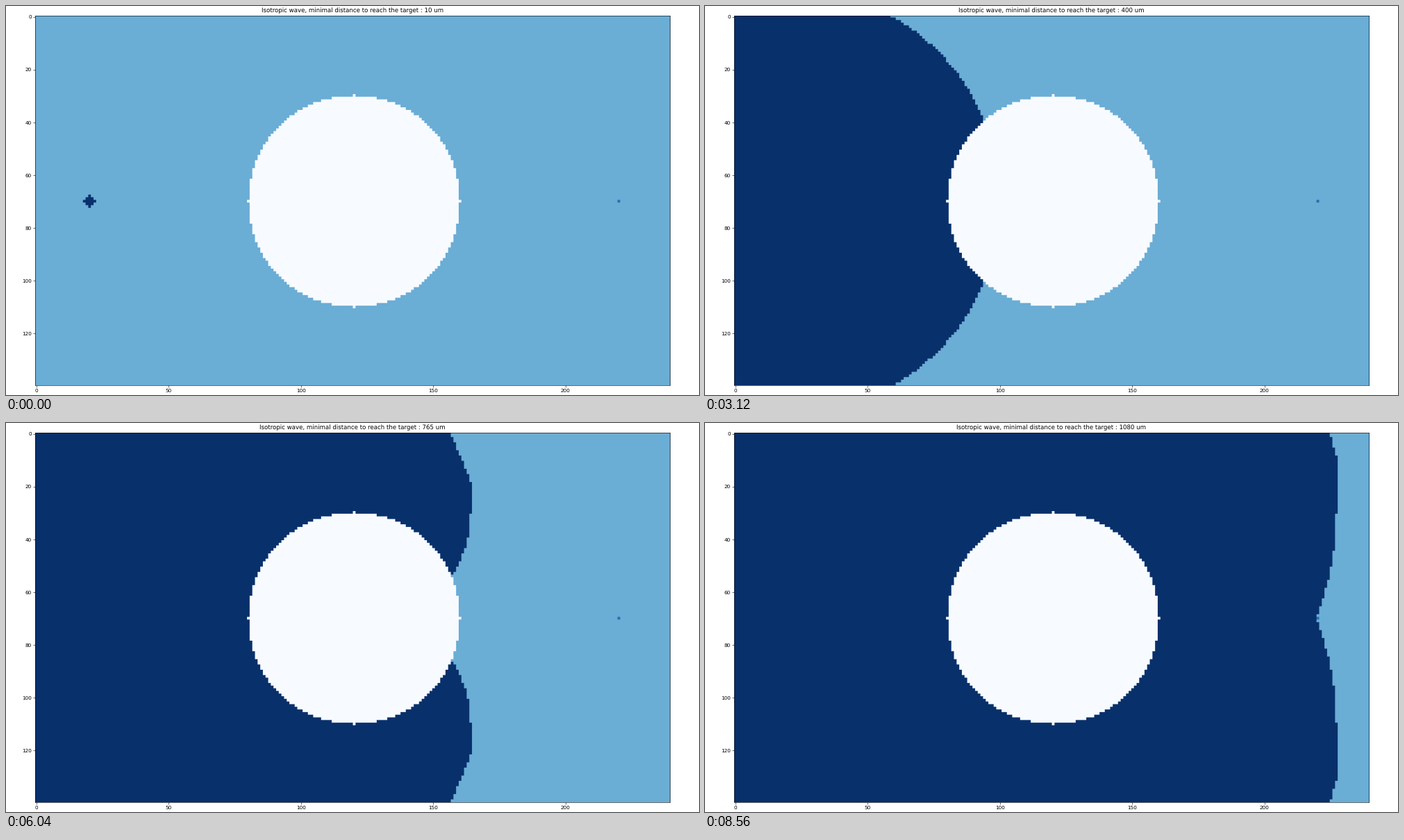
Recreate the animation shown at these times as a matplotlib script. Size 998x561 px, loop 9600 ms.

```python
import numpy as np
import matplotlib.pyplot as plt
from matplotlib.animation import FuncAnimation

W, H, DPI = 998, 561, 52
COLS, ROWS = 240, 140
START, CENTRE, TARGET = (20, 70), (120, 70), (220, 70)
RADIUS = 40
STEP_MS, STEPS, FRAMES = 40, 214, 240
UM_PER_CELL = 5

OBSTACLE, MEDIUM, GOAL, WAVE = 0, 2, 3, 4

# Layout in pixels: axes box, top-left corner of the grid, cell size.
LEFT, RIGHT, TOP, BOTTOM = 42, 956, 14, 547
GRID_X, GRID_Y, CELL = 42.2, 13.6, 3.807
SMOOTH = 4


def arrival_times():
    """Radius at which the wave front reaches each cell of the grid."""
    y, x = np.mgrid[:ROWS, :COLS]
    dy = np.abs(y - CENTRE[1])
    direct = np.hypot(x - START[0], dy)

    # The top and bottom of the disc emit secondary wavelets.
    top = np.ceil(np.hypot(CENTRE[0] - START[0], RADIUS + 1))
    past = x - CENTRE[0]
    beside = np.maximum(direct, top + past)
    # The two wavelets merge a little late on the axis.
    behind = top + np.hypot(past, RADIUS - dy) + 0.2 * (dy == 0)
    shadow = np.where(dy >= RADIUS, beside, behind)
    times = np.where(past > 0, shadow, direct)

    blocked = past**2 + dy**2 <= RADIUS**2
    times[blocked] = np.inf
    return times, blocked


def picture(cells):
    """Pad by one cell and subdivide, so cell edges fall between pixels."""
    padded = np.pad(cells, 1, mode="edge")
    return palette[padded.repeat(SMOOTH, axis=0).repeat(SMOOTH, axis=1)]


def to_cell(pixel, origin):
    return (pixel - origin) / CELL - 0.5


palette = plt.get_cmap("Blues")(np.linspace(0, 1, WAVE + 1), bytes=True)
times, blocked = arrival_times()
medium = np.full((ROWS, COLS), MEDIUM)
medium[blocked] = OBSTACLE
medium[TARGET[1], TARGET[0]] = GOAL

plt.rcParams["text.hinting"] = "none"
fig = plt.figure(figsize=((W + 0.001) / DPI, (H + 0.001) / DPI), dpi=DPI,
                 facecolor="white")
ax = fig.add_axes([LEFT / W, 1 - BOTTOM / H, (RIGHT - LEFT) / W, (BOTTOM - TOP) / H])
image = ax.imshow(picture(medium), interpolation="bilinear", aspect="auto",
                  extent=(-1.5, COLS + 0.5, ROWS + 0.5, -1.5))
ax.set_xticks(range(0, COLS, 50))
ax.set_yticks(range(0, ROWS, 20))
ax.set_xlim(to_cell(LEFT, GRID_X), to_cell(RIGHT, GRID_X))
ax.set_ylim(to_cell(BOTTOM, GRID_Y), to_cell(TOP, GRID_Y))
title = ax.set_title("", fontsize=12, pad=6.5, y=1.0)


def update(frame):
    radius = 2 + min(frame, STEPS)
    image.set_data(picture(np.where(times <= radius, WAVE, medium)))
    title.set_text("Isotropic wave, minimal distance to reach the target : "
                   f"{radius * UM_PER_CELL} um")
    return image, title


def reset():
    return update(0)


anim = FuncAnimation(fig, update, frames=FRAMES, init_func=reset,
                     interval=STEP_MS, repeat=True, repeat_delay=0, blit=False)
plt.show()
```
